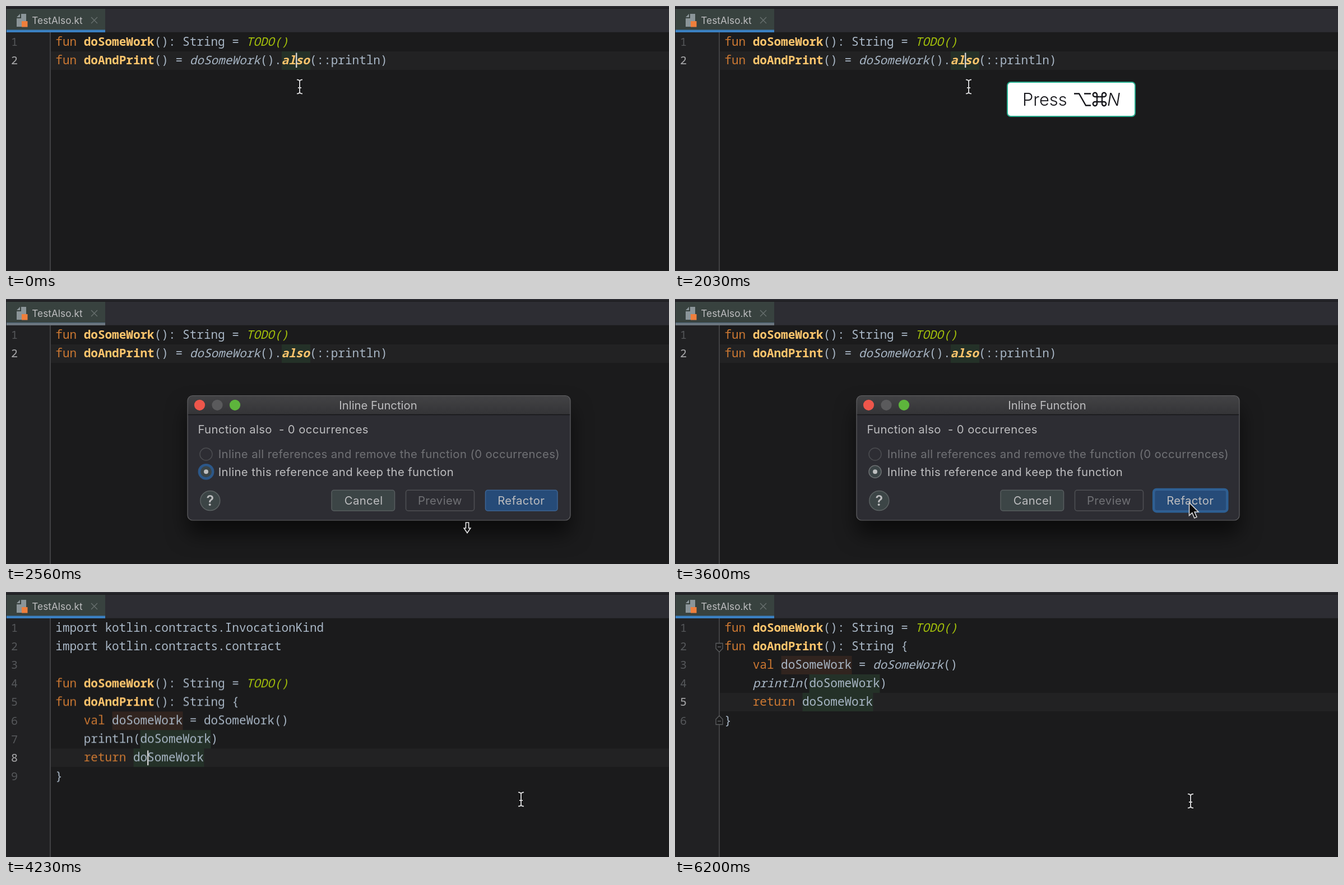
Animation of 1183 by 473 pixels, one loop 6660 ms. Source, as an HTML page:

```html
<!DOCTYPE html>
<html lang="en">
<head>
<meta charset="utf-8">
<title>Inline function refactoring</title>
<style>
html, body { margin: 0; width: 100%; height: 100%; overflow: hidden; background: #1b1b1c; }
svg { display: block; width: 100vw; height: 100vh; }
text { white-space: pre; }

.code { font: 500 21px "Noto Sans Mono", "DejaVu Sans Mono", monospace; fill: #a9b7c6; }
.kw { fill: #cc7832; }
.fn { fill: #ffc66d; font-weight: 600; }
.todo { fill: #a5c20a; }
.num { font-size: 20px; font-weight: 400; fill: #56585b; }
.now { fill: #a4a4a6; }
.row { fill: #222223; }
.read { fill: #243128; }
.write { fill: #31241f; }
.caret { fill: #cfcfd0; }

.ui { font: 400 20.3px Inter, "Open Sans", sans-serif; letter-spacing: .39px; fill: #bdbdbf; }
.mid { text-anchor: middle; }
.off { fill: #707175; }
.title { letter-spacing: 0; }
.help { font-size: 25px; font-weight: 600; letter-spacing: 0; }
.tab { font-size: 17.2px; letter-spacing: .05px; }
.press { font-size: 30.8px; font-weight: 360; letter-spacing: 0; fill: #15151a; }
.it { font-style: italic; }
.line { fill: none; }

/* One clock for every part: 1% = 66.6 ms */
.a { animation: 6660ms step-end infinite; }
.toast { animation-name: toast; }
.dialog { animation-name: dialog; filter: drop-shadow(0 24px 18px rgba(0, 0, 0, .58)); }
.blur { animation-name: blurred; }
.ring { animation-name: ring; }
.press-ring { animation-name: press-ring; }
.before { animation-name: before; }
.after { animation-name: after; }
.imports { animation-name: imports; }
.tidy { animation-name: tidy; }
.result { animation-name: result; }
.marks { animation-name: marks; }
.folds { animation-name: folds; }
.slant { animation-name: slant; }
.blink1 { animation-name: blink1; }
.blink2 { animation-name: blink2; }
.mouse { animation-name: mouse; }
.beam { animation-name: beam; }
.arrow { animation-name: arrow; }
.resize { animation-name: resize; }

@keyframes toast { 0% { opacity: 0 } 9% { opacity: 1 } 31.08%, to { opacity: 0 } }
@keyframes dialog { 0% { opacity: 0 } 31.08% { opacity: 1 } 56.45%, to { opacity: 0 } }
@keyframes blurred { 0% { opacity: 0 } 31.08% { opacity: 1 } 60.51%, to { opacity: 0 } }
@keyframes ring { 0% { opacity: 1 } 54.05%, to { opacity: 0 } }
@keyframes press-ring { 0% { opacity: 0 } 54.05%, to { opacity: 1 } }
@keyframes before { 0% { opacity: 1 } 61.56%, to { opacity: 0 } }
@keyframes after { 0% { opacity: 0 } 61.56%, to { opacity: 1 } }
@keyframes imports { 0% { opacity: 0 } 61.56% { opacity: 1 } 63.96%, to { opacity: 0 } }
@keyframes tidy { 0% { opacity: 0 } 63.96%, to { opacity: 1 } }
@keyframes result {
  0% { opacity: 0; transform: translateY(99.3px) }
  61.56% { opacity: 1; transform: translateY(99.3px) }
  63.96%, to { opacity: 1; transform: none }
}
@keyframes marks { 0% { opacity: 0 } 62.46%, to { opacity: 1 } }
@keyframes folds { 0% { opacity: 0 } 68.46%, to { opacity: 1 } }
@keyframes slant { 0% { font-style: normal } 69.06%, to { font-style: italic } }
@keyframes blink1 {
  0%, 15.46%, 30.48%, 60.51% { opacity: 1 }
  7.95%, 22.97%, 31.08%, 61.56%, to { opacity: 0 }
}
@keyframes blink2 { 0%, 85.58% { opacity: 1 } 78.07%, 93.09%, to { opacity: 0 } }

@keyframes mouse {
  0% { transform: translate(524px, 144px) }
  30.48% { transform: translate(524px, 144px); animation-timing-function: steps(2) }
  31.53% { transform: translate(677px, 187px) }
  32.43% { transform: translate(705px, 232px); animation-timing-function: steps(3) }
  33.93% { transform: translate(775px, 335px); animation-timing-function: steps(4) }
  36.03% { transform: translate(823px, 414px) }
  38.43% { transform: translate(823px, 408px) }
  39.48% { transform: translate(828px, 394px); animation-timing-function: steps(5) }
  42.04% { transform: translate(892px, 371px); animation-timing-function: steps(5) }
  44.44% { transform: translate(918px, 364px) }
  48.04% { transform: translate(917.5px, 363.5px) }
  49.54% { transform: translate(917px, 363px) }
  60.51% { transform: translate(919px, 370px) }
  91.59% { transform: translate(919px, 371px) }
  92.34% { transform: translate(920px, 372px) }
  93.09%, to { transform: translate(920px, 373px) }
}
@keyframes beam { 0%, 36.03%, 60.51%, to { opacity: 1 } 31.08%, 38.43% { opacity: 0 } }
@keyframes arrow { 0%, 36.03%, 60.51%, to { opacity: 0 } 31.08%, 39.48% { opacity: 1 } }
@keyframes resize { 0% { opacity: 0 } 38.43% { opacity: 1 } 39.48%, to { opacity: 0 } }
</style>
</head>
<body>
<svg viewBox="0 0 1183 473" preserveAspectRatio="none">
  <defs>
    <linearGradient id="bar" x2="0" y2="1">
      <stop stop-color="#434345"/><stop offset="1" stop-color="#343437"/>
    </linearGradient>
    <path id="loop" d="M0 -4.5H-4.5V-8.1A3.6 3.6 0 1 0 -8.1 -4.5H-4.5V0"/>
    <path id="ibeam" d="M-5 -12.5C-2 -12.5 0 -11.5 0 -9C0 -11.5 2 -12.5 5 -12.5M-5 12.5C-2 12.5 0 11.5 0 9C0 11.5 2 12.5 5 12.5M0 -9V9M-3 2H3"/>
  </defs>

  <!-- Editor and tab bar -->
  <rect width="1183" height="473" fill="#1b1b1c"/>
  <rect y="46" width="79" height="427" fill="#212123"/>
  <rect width="1183" height="47" fill="#2d2d33"/>
  <rect y="2.5" width="1183" height="2" fill="#1b1b1d"/>
  <rect y="46" width="1183" height="1" fill="#29292c"/>
  <rect x="1" y="5" width="176" height="38" fill="#38423f"/>
  <rect x="1" y="42.5" width="176" height="4.5" fill="#3b80c2"/>
  <rect class="a blur" x="1" y="42.5" width="176" height="4.5" fill="#6b757e"/>
  <path d="M27 14H36V37H19V22H27Z M25 14V20H19Z" fill="#8b9599"/>
  <rect x="28" y="27" width="10.5" height="10.5" fill="#ef7f3c"/>
  <text class="ui tab" x="46.3" y="31.7">TestAlso.kt</text>
  <path class="line" d="M152 20L163 31M163 20L152 31" stroke="#68706f" stroke-width="1.4"/>

  <!-- Line numbers -->
  <g class="code num">
    <text x="9" y="71">1</text>
    <text x="9" y="104.1">2</text>
    <text class="a after"><tspan x="9" y="137.2">3</tspan><tspan x="9" y="170.3">4</tspan><tspan x="9" y="203.4">5</tspan><tspan x="9" y="236.5">6</tspan></text>
    <text class="a imports"><tspan x="9" y="269.6">7</tspan><tspan x="9" y="302.7">8</tspan><tspan x="9" y="335.8">9</tspan></text>
  </g>

  <!-- Code before the refactoring -->
  <g class="code a before">
    <rect class="row" x="80" y="81" width="1103" height="33"/>
    <rect class="read" x="492" y="81" width="51" height="33"/>
    <text class="num now" x="9" y="104.1">2</text>
    <text x="88.3" y="71"><tspan class="kw">fun</tspan> <tspan class="fn">doSomeWork</tspan>(): String = <tspan class="todo it">TODO()</tspan></text>
    <text x="88.3" y="104.1"><tspan class="kw">fun</tspan> <tspan class="fn">doAndPrint</tspan>() = <tspan class="it">doSomeWork</tspan>().<tspan class="fn it">also</tspan>(::println)</text>
    <rect class="caret a blink1" x="517" y="83.5" width="2.4" height="26.5"/>
  </g>

  <!-- Code after it -->
  <g class="code a imports">
    <text x="88.3" y="71">import kotlin.contracts.InvocationKind</text>
    <text x="88.3" y="104.1">import kotlin.contracts.contract</text>
    <text class="num now" x="9" y="302.7">8</text>
  </g>
  <g class="code a result">
    <rect class="row" x="80" y="180" width="1103" height="33"/>
    <g class="a marks">
      <rect class="write" x="189.5" y="114" width="126" height="33"/>
      <rect class="read" x="239.5" y="147" width="126" height="33"/>
      <rect class="read" x="227.5" y="180" width="126" height="33"/>
    </g>
    <text x="88.3" y="71"><tspan class="kw">fun</tspan> <tspan class="fn">doSomeWork</tspan>(): String = <tspan class="todo it">TODO()</tspan></text>
    <text x="88.3" y="104.1"><tspan class="kw">fun</tspan> <tspan class="fn">doAndPrint</tspan>(): String {</text>
    <text x="88.3" y="137.2">    <tspan class="kw">val</tspan> doSomeWork = <tspan class="a slant">doSomeWork</tspan>()</text>
    <text x="88.3" y="170.3">    <tspan class="a slant">println</tspan>(doSomeWork)</text>
    <text x="88.3" y="203.4">    <tspan class="kw">return</tspan> doSomeWork</text>
    <text x="88.3" y="236.5">}</text>
    <text class="num now a tidy" x="9" y="203.4">5</text>
    <rect class="caret a blink2" x="252" y="183.5" width="2.4" height="26.5"/>
  </g>
  <path d="M79 47V473" stroke="#505153" stroke-width="1.4"/>
  <g class="a folds" fill="#1b1b1c" stroke="#5d5f61" stroke-width="1.3">
    <path d="M73 91.5H85V101L79 107L73 101ZM76 98H82"/>
    <path d="M73 236.5H85V227L79 221L73 227ZM76 230.5H82"/>
  </g>

  <!-- Shortcut hint -->
  <g class="a toast">
    <rect x="593" y="136" width="228" height="61" rx="6" fill="#fff" stroke="#27ae8f" stroke-width="2"/>
    <text class="ui press" x="620" y="178">Press</text>
    <g class="line" stroke="#15151a" stroke-width="2.4">
      <path d="M712 156.5H721L733 177.5H742M730 156.5H742"/>
      <g transform="translate(757.5 166.5)">
        <use href="#loop"/>
        <use href="#loop" transform="rotate(90)"/>
        <use href="#loop" transform="rotate(180)"/>
        <use href="#loop" transform="rotate(270)"/>
      </g>
    </g>
    <text class="ui press it" x="771" y="178">N</text>
  </g>

  <!-- Dialog -->
  <g class="a dialog">
    <rect x="324" y="172.5" width="683" height="222.5" rx="9" fill="#2d2d33"/>
    <path d="M324 206V181.5a9 9 0 0 1 9 -9H998a9 9 0 0 1 9 9V206Z" fill="url(#bar)"/>
    <path d="M324 206.5H1007" stroke="#161618" stroke-width="1.5"/>
    <rect class="line" x="324" y="172.5" width="683" height="222.5" rx="9" stroke="#626265" stroke-width="1.2"/>
    <circle cx="345.5" cy="189.3" r="9.6" fill="#ee564b"/>
    <circle cx="377" cy="189.3" r="9.6" fill="#5a5a5c"/>
    <circle cx="408.5" cy="189.3" r="9.6" fill="#5db53c"/>

    <circle class="line" cx="357" cy="277" r="11" stroke="#4b4c50" stroke-width="1.5"/>
    <circle cx="357" cy="308.3" r="11" fill="#3b4446" stroke="#6b6f71" stroke-width="1.5"/>
    <circle class="a ring" cx="357" cy="308.3" r="12.2" fill="#3b4446" stroke="#2c5788" stroke-width="4.4"/>
    <circle cx="357" cy="308.3" r="4" fill="#bdbebf"/>

    <g stroke-width="1.5">
      <circle cx="364.3" cy="360" r="17.5" fill="#3c4546" stroke="#5a6061"/>
      <rect x="581" y="341.3" width="112.5" height="36.7" rx="4" fill="#3c4546" stroke="#575d5f"/>
      <rect class="line" x="713.5" y="341.3" width="122" height="36.7" rx="4" stroke="#4f5054"/>
      <rect x="855.5" y="341.3" width="128.5" height="36.7" rx="4" fill="#264b78" stroke="#3c6494"/>
    </g>
    <rect class="line a press-ring" x="853.7" y="339.5" width="132" height="40.2" rx="5.5" stroke="#2d5f93" stroke-width="3.6"/>

    <g class="ui">
      <text class="title mid" x="664" y="197">Inline Function</text>
      <text x="342.4" y="240">Function also  - 0 occurrences</text>
      <text class="off" x="378.7" y="284.2">Inline all references and remove the function (0 occurrences)</text>
      <text x="378.7" y="315.7">Inline this reference and keep the function</text>
      <text class="mid help" x="364.4" y="369">?</text>
      <text class="mid" x="638.2" y="367.4">Cancel</text>
      <text class="mid off" x="774.4" y="367.4">Preview</text>
      <text class="mid" x="919.2" y="367.4">Refactor</text>
    </g>
  </g>

  <!-- Mouse pointer -->
  <g class="a mouse">
    <g class="a beam line">
      <use href="#ibeam" stroke="#0c0c0d" stroke-width="4.4"/>
      <use href="#ibeam" stroke="#d2d2d3" stroke-width="2"/>
    </g>
    <path class="a arrow" d="M0.5 0.5V23.5L5.8 18.6L9.8 28L14 26.2L10 17H17Z" fill="#0b0b0c" stroke="#d8d8d9" stroke-width="1.6"/>
    <path class="a resize" d="M-2.6 -9H2.6V1H5.8L0 9.5L-5.8 1H-2.6Z" fill="#111112" stroke="#e4e4e5" stroke-width="1.6"/>
  </g>
</svg>
</body>
</html>
```
